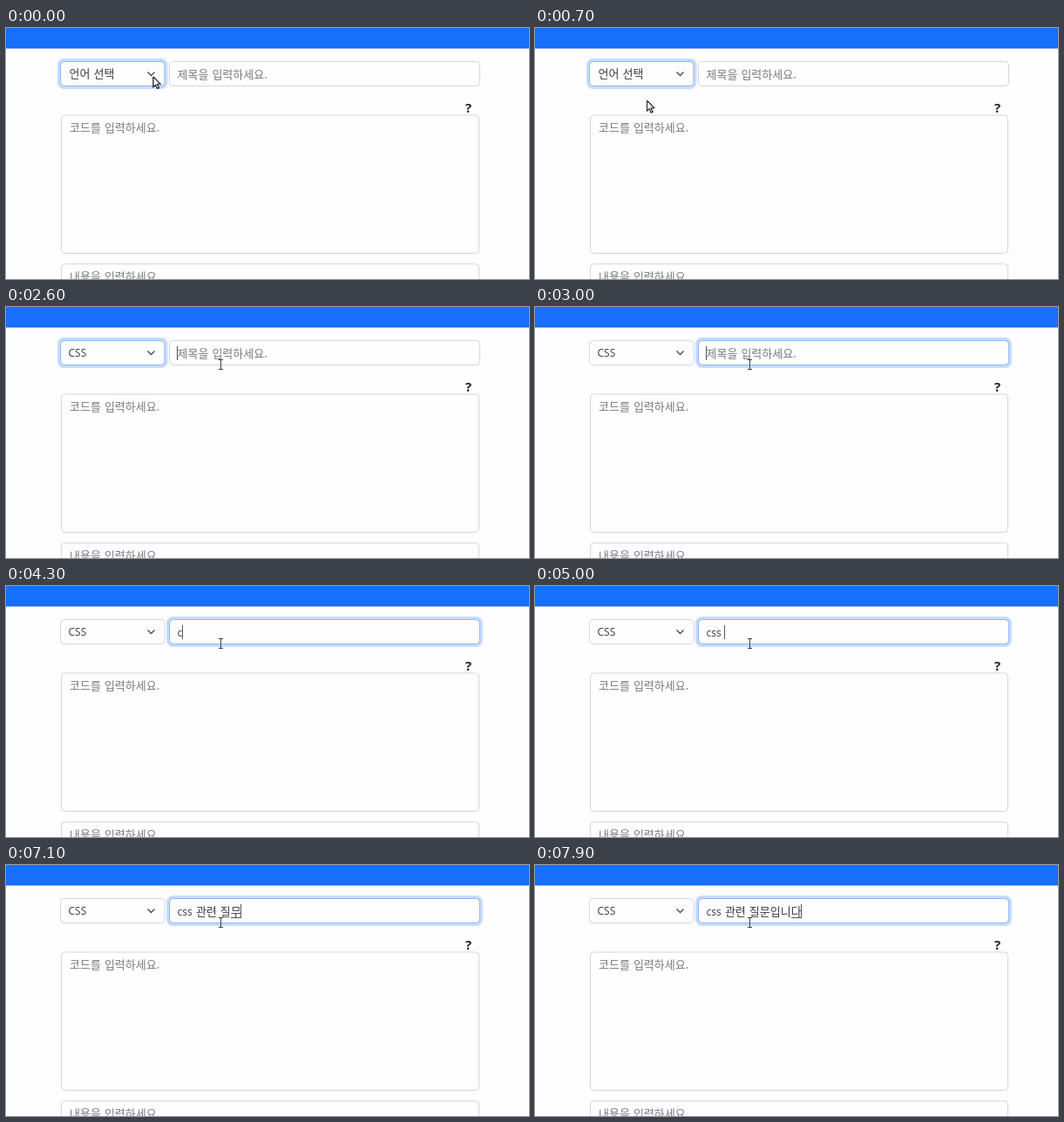
Recreate the animation shown at these times as an HTML page with a canvas. Size 600 by 288 pixels, loop 8000 ms.

```html
<!DOCTYPE html>
<html lang="ko">
<head>
<meta charset="utf-8">
<style>
  html, body { margin: 0; width: 100%; height: 100%; overflow: hidden; background: #fefdff; }
  canvas { display: block; }
</style>
</head>
<body>
<canvas id="stage" width="600" height="288"></canvas>
<script>
const ctx = document.getElementById('stage').getContext('2d');
const HANGUL = '13px "Noto Sans CJK KR", "Noto Sans CJK", sans-serif';
const LATIN = '12px "Open Sans", sans-serif';
const INK = '#3a3c40', HINT = '#777b7e';
const LOOP = 8000, CHOOSE = 1100, FOCUS = 2600;

// Typing: time, finished text, syllable still being composed
const keys = [
  [4200, 'c', ''], [4700, 'cs', ''], [4900, 'css', ''], [5000, 'css ', ''],
  [5200, 'css ', 'ㄱ'], [5500, 'css ', '고'], [5900, 'css ', '과'], [6100, 'css ', '관'],
  [6200, 'css 관', 'ㄹ'], [6300, 'css 관', '려'], [6400, 'css 관', '련'], [6500, 'css 관련 ', ''],
  [6600, 'css 관련 ', 'ㅈ'], [6700, 'css 관련 ', '지'], [6900, 'css 관련 ', '질'],
  [7000, 'css 관련 ', '짊'], [7100, 'css 관련 질', '무'], [7200, 'css 관련 질', '문'],
  [7300, 'css 관련 질문', 'ㅇ'], [7400, 'css 관련 질문', '이'], [7500, 'css 관련 질문', '입'],
  [7600, 'css 관련 질문입', 'ㄴ'], [7700, 'css 관련 질문입', '니'], [7800, 'css 관련 질문입', '닏'],
  [7900, 'css 관련 질문입니', '다']
];

// Pointer moves: start, end, from, to
const moves = [
  [200, 1000, [169, 56], [110, 96]],
  [1600, 1600, [110, 96], [160, 129]],
  [2000, 2500, [160, 129], [246, 66]]
];

const clamp = v => Math.min(1, Math.max(0, v));
const ease = v => v * v * (3 - 2 * v);

function write(text, x, y, color, font = HANGUL) {
  ctx.font = font;
  ctx.wordSpacing = '1.1px';
  ctx.fillStyle = color;
  ctx.fillText(text, x, y);
  return x + ctx.measureText(text).width;
}

function outline(x, y, w, h, r, color, width = 1) {
  ctx.beginPath();
  ctx.roundRect(x, y, w, h, r);
  ctx.strokeStyle = color;
  ctx.lineWidth = width;
  ctx.stroke();
}

function field(x, y, w, h, focus = 0) {
  outline(x, y, w, h, 4, '#d4d7dc');
  if (!focus) return;
  ctx.globalAlpha = focus;
  outline(x - 2, y - 2, w + 4, h + 4, 6, '#c8dcfb', 3);
  outline(x, y, w, h, 4, '#8fb6f2');
  ctx.globalAlpha = 1;
}

function path(points, color, width) {
  ctx.beginPath();
  points.forEach(p => ctx.lineTo(...p));
  ctx.strokeStyle = color;
  ctx.lineWidth = width;
  ctx.stroke();
}

function pointer(t) {
  let [x, y] = moves[0][2];
  for (const [start, end, a, b] of moves) {
    if (t < start) break;
    const k = end > start ? ease(clamp((t - start) / (end - start))) : 1;
    x = a[0] + (b[0] - a[0]) * k;
    y = a[1] + (b[1] - a[1]) * k;
  }
  const beam = t >= CHOOSE && (y <= 67 || y > 95);
  ctx.save();
  ctx.translate(x, y);
  if (beam) {
    ctx.fillStyle = '#404246';
    ctx.fillRect(0, -6, 1, 12);
    ctx.fillRect(-2, -6, 5, 1);
    ctx.fillRect(-2, 5, 5, 1);
  } else {
    const arrow = [[0, 0], [0, 11.5], [2.6, 9.2], [4.6, 13.5], [6.4, 12.7], [4.5, 8.5], [8, 8.2], [0, 0]];
    path(arrow, '#303236', 1.2);
    ctx.fillStyle = '#fff';
    ctx.fill();
    ctx.stroke();
  }
  ctx.restore();
}

function title(t) {
  const key = keys.findLast(k => t >= k[0]);
  const left = 196.5, base = 57.5;
  if (!key) write('제목을 입력하세요.', left, base, HINT);
  if (t < FOCUS) return;
  const [since, done, composing] = key || [FOCUS, '', ''];
  let x = write(done.slice(0, 4), left, base, INK, LATIN);
  x = write(done.slice(4), x, base, INK);
  const caret = write(composing, x, base, INK);
  ctx.fillStyle = '#555';
  if (composing) ctx.fillRect(Math.round(x), 60, caret - x, 1);
  if (composing || (t - since) % 1000 < 500) ctx.fillRect(Math.floor(caret), 45, 1, 16);
}

function draw(now) {
  const t = now % LOOP;
  const focus = ease(clamp((t - FOCUS) / 150));
  ctx.fillStyle = '#fefdff';
  ctx.fillRect(0, 0, 600, 288);
  ctx.fillStyle = '#176ffb';
  ctx.fillRect(0, 0, 600, 22);
  ctx.fillStyle = '#1767e6';
  ctx.fillRect(0, 22, 600, 1.5);

  field(62.5, 38.5, 119.5, 28, 1 - focus);
  if (t < CHOOSE) write('언어 선택', 72.5, 57, INK);
  else write('CSS', 71.5, 57, INK, LATIN);
  path([[162.5, 50.5], [166.5, 54.5], [170.5, 50.5]], '#45494f', 1.3);

  field(187.5, 38.5, 356, 28, focus);
  title(t);

  write('?', 527, 96.5, '#202226', 'bold 15px "Open Sans", sans-serif');
  field(63.5, 100, 479, 158.5);
  write('코드를 입력하세요.', 73, 118.5, HINT);
  field(63.5, 270.8, 479, 60);
  write('내용을 입력하세요.', 73, 289.5, HINT);

  pointer(t);
  requestAnimationFrame(draw);
}
requestAnimationFrame(draw);
</script>
</body>
</html>
```
